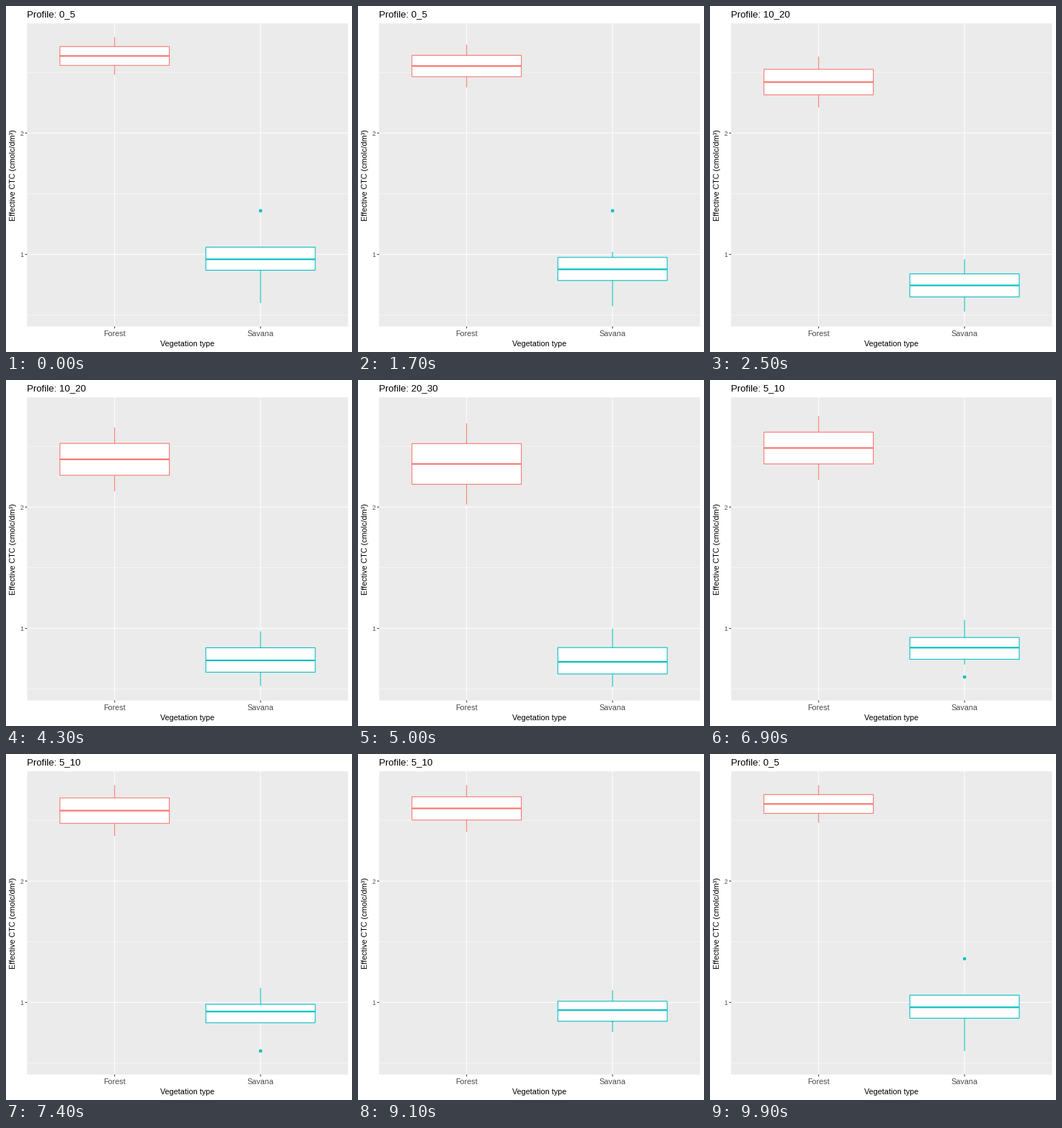
Recreate the animation shown at these times as a matplotlib script. Size 480 by 480 pixels, loop 10000 ms.

```python
import matplotlib.pyplot as plt
import numpy as np
from matplotlib.animation import FuncAnimation
from matplotlib.patches import Circle, Polygon, Rectangle

SIZE, DPI = 480, 80
PX = 72 / DPI  # points per pixel

plt.rcParams.update({
    "font.family": "Liberation Sans",
    "text.hinting": "force_autohint",
    "text.hinting_factor": 8,
    "text.kerning_factor": 0,
    "path.snap": False,
})

LEFT, RIGHT, TOP, BOTTOM = 29.3, 474.5, 24.1, 444.6
Y_MIN, Y_MAX = 0.4065, 2.9035
LINE = 1.07
CENTERS = (150.7, 353.1)
HALF_BOX = 75.9
CORAL, TEAL = "#F8766D", "#00BFC4"
TITLE_SIZE, LABEL_SIZE, TICK_SIZE = 13.2, 10.8, 8.8

PROFILES = ("0_5", "10_20", "20_30", "5_10")
# Forest holds two samples per profile, so its quartiles follow from the range.
FOREST = [np.linspace(lo, hi, 5) for lo, hi in
          ((2.48, 2.79), (2.21, 2.63), (2.02, 2.69), (2.37, 2.79))]
SAVANA = [np.array(v) for v in (
    (0.60, 0.87, 0.96, 1.06, 1.06),
    (0.53, 0.65, 0.745, 0.84, 0.96),
    (0.52, 0.625, 0.725, 0.8425, 1.00),
    (0.8325, 0.8325, 0.925, 0.985, 1.12),
)]
OUTLIERS = (1.36, None, None, 0.60)
MOVES = ((12, 25), (38, 50), (62, 74), (87, 99))
FRAMES, INTERVAL = 100, 100


def y_px(value):
    return BOTTOM - (value - Y_MIN) * (BOTTOM - TOP) / (Y_MAX - Y_MIN)


fig = plt.figure(figsize=(SIZE / DPI, SIZE / DPI), dpi=DPI, facecolor="white")
ax = fig.add_axes((0, 0, 1, 1))
ax.set_xlim(0, SIZE)
ax.set_ylim(SIZE, 0)
ax.axis("off")


def line(xs, ys, color, width=LINE, z=2):
    return ax.plot(xs, ys, color=color, lw=width * PX, zorder=z,
                   solid_capstyle="butt", snap=False)[0]


def label(x, y, text, size, color="black", ha="center", **kw):
    return ax.text(x, y, text, fontsize=size * PX, color=color,
                   ha=ha, va="baseline", **kw)


class Box:
    def __init__(self, x, color):
        self.x0, self.x1 = x - HALF_BOX, x + HALF_BOX
        self.whisker = line([x, x], [0, 0], color, z=4)
        self.body = Polygon([(0, 0)] * 4, fc="white", ec=color, lw=LINE * PX,
                            joinstyle="miter", zorder=5, snap=False)
        ax.add_patch(self.body)
        self.median = line([self.x0, self.x1], [0, 0], color, 2 * LINE, z=6)

    def set(self, stats):
        low, q1, mid, q3, high = y_px(stats)
        self.whisker.set_ydata([low, high])
        self.body.set_xy([(self.x0, q3), (self.x0, q1),
                          (self.x1, q1), (self.x1, q3)])
        self.median.set_ydata([mid, mid])


# Panel and grid
ax.add_patch(Rectangle((LEFT, TOP), RIGHT - LEFT, BOTTOM - TOP,
                       fc="#EBEBEB", lw=0, zorder=1, snap=False))
for v in (0.5, 1.5, 2.5):
    line([LEFT, RIGHT], [y_px(v)] * 2, "white", LINE / 2)
for v in (1, 2):
    y = y_px(v)
    line([LEFT, RIGHT], [y, y], "white")
    line([LEFT - 2.75, LEFT], [y, y], "#333333")
    label(24.35, round(y + 3.3), str(v), TICK_SIZE, "#4D4D4D", "right")
for x, name in zip(CENTERS, ("Forest", "Savana")):
    line([x, x], [TOP, BOTTOM], "white")
    line([x, x], [BOTTOM, BOTTOM + 2.75], "#333333")
    label(x, 458, name, LABEL_SIZE, "#4D4D4D")

# Titles
title = label(LEFT, 15, "", TITLE_SIZE, ha="left")
label((LEFT + RIGHT) / 2, 472, "Vegetation type", LABEL_SIZE)
label(13, (TOP + BOTTOM) / 2, "Effective CTC (cmolc/dm³)", LABEL_SIZE,
      rotation=90, rotation_mode="anchor")

forest = Box(CENTERS[0], CORAL)
savana = Box(CENTERS[1], TEAL)
dot = Circle((CENTERS[1], 0), 2.3, fc=TEAL, lw=0, zorder=3, snap=False)
ax.add_patch(dot)


def pose(frame):
    """Current profile index and progress towards the next one."""
    for i, (start, end) in enumerate(MOVES):
        if frame < end:
            return i, max(0, frame - start) / (end - start)
    return 0, 0


def outlier(i, j, t):
    a, b = OUTLIERS[i], OUTLIERS[j]
    if t == 0:
        return a
    if a is None or b is None:
        return b if a is None else a
    return a + (b - a) * t


def draw(frame):
    i, t = pose(frame)
    j = (i + 1) % len(PROFILES)
    forest.set(FOREST[i] * (1 - t) + FOREST[j] * t)
    savana.set(SAVANA[i] * (1 - t) + SAVANA[j] * t)
    value = outlier(i, j, t)
    dot.set_visible(value is not None)
    if value is not None:
        dot.center = (CENTERS[1], y_px(value))
    title.set_text("Profile: " + PROFILES[i if t < 0.5 else j])
    return ()


anim = FuncAnimation(fig, draw, frames=FRAMES, interval=INTERVAL,
                     init_func=lambda: draw(0), repeat=True, repeat_delay=0)
plt.show()
```
